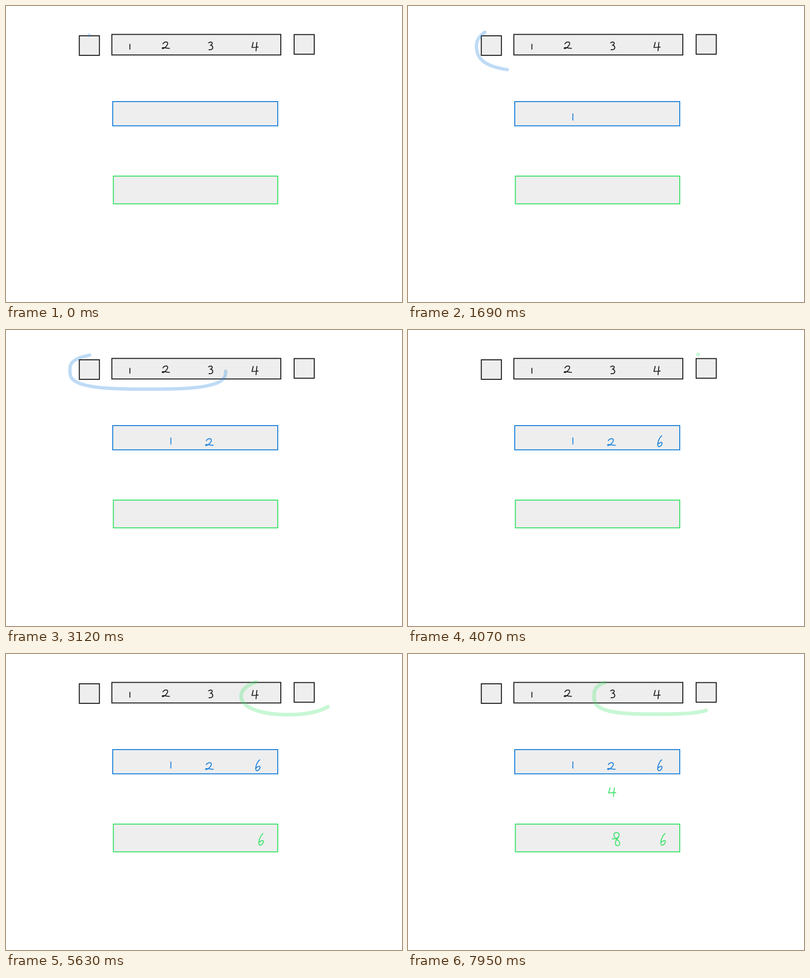
An HTML page with a canvas for the animation above (8 s loop, 768 by 576 pixels).

```html
<!DOCTYPE html>
<html lang="en">
<head>
<meta charset="utf-8">
<title>Running products</title>
<style>
  html, body { margin: 0; width: 100%; height: 100%; overflow: hidden; background: #fff; }
  canvas { display: block; width: 768px; height: 576px; }
</style>
</head>
<body>
<canvas id="stage" width="768" height="576"></canvas>
<script>
const ctx = document.getElementById('stage').getContext('2d');
const LOOP = 8000;
const INK = '#1c1c1e', BLUE = '#1f83dd', GREEN = '#3fe26c';

const sample = (fn, n) => Array.from({ length: n + 1 }, (_, i) => fn(i / n));
const gap = (a, b) => Math.hypot(b[0] - a[0], b[1] - a[1]);
const lengthOf = pts => pts.slice(1).reduce((sum, p, i) => sum + gap(pts[i], p), 0);

// Chain of cubic curves: one start point, then three points per piece.
function bezier(...p) {
  let pts = [p[0]];
  for (let i = 0; i + 3 < p.length; i += 3) {
    pts = pts.concat(sample(u => {
      const v = 1 - u;
      return [0, 1].map(k => v * v * v * p[i][k] + 3 * v * v * u * p[i + 1][k] +
        3 * v * u * u * p[i + 2][k] + u * u * u * p[i + 3][k]);
    }, 20));
  }
  return pts;
}

// Rounded loop drawn anticlockwise; open and close let its two ends stray.
function ring(cx, cy, rx, ry, { start, turns = 1, square = 2.4, open = 0, close = 0 }) {
  return sample(u => {
    const a = start - turns * 2 * Math.PI * u;
    const c = Math.cos(a), s = Math.sin(a);
    const edge = (Math.abs(c) ** square + Math.abs(s) ** square) ** (-1 / square);
    const r = edge * (1 + open * (1 - u) ** 12 - close * u ** 12);
    return [cx + rx * r * c, cy + ry * r * s];
  }, 120);
}

// Curved shaft, then a head whose arms follow the shaft's last direction.
function arrow(a, b, c, tip) {
  const back = Math.atan2(c[1] - tip[1], c[0] - tip[0]);
  const arm = turn => [tip[0] + 19 * Math.cos(back + turn), tip[1] + 19 * Math.sin(back + turn)];
  return [bezier(a, b, c, tip), [arm(-0.78), tip, arm(0.44)]];
}
const drop = (x, y) => arrow([x, y], [x + 30, y + 10], [x + 55, y + 32], [x + 67, y + 60]);

// Handwritten digits in a unit box
const DIGITS = {
  1: [[[0, 0], [0, 1]]],
  2: [bezier([0.1, 0.25], [0.25, -0.1], [0.9, -0.2], [0.72, 0.35],
    [0.55, 0.75], [0.1, 1.1], [0, 0.95], [0, 0.7], [0.5, 0.95], [1, 0.95])],
  3: [bezier([0, 0.08], [0.9, -0.25], [1.2, 0.3], [0.4, 0.4], [1.3, 0.45], [1.2, 1.1], [0.1, 1])],
  4: [[[0.2, 0], [0, 0.6], [1, 0.55]], [[0.8, 0], [0.66, 1]]],
  6: [bezier([0.85, 0], [0.2, 0.2], [-0.3, 1], [0.3, 1], [0.9, 1], [1.4, 0.3], [0.1, 0.75])],
  8: [bezier([0, 0.48], [1.1, 0.5], [1.05, 0], [0.6, 0], [-0.1, 0], [0.3, 0.42], [0.65, 0.55],
    [1.15, 0.75], [1, 1], [0.68, 1], [0.25, 1], [0.4, 0.55], [0.8, 0.38])]
};
const digit = (d, x, y, w, h) => DIGITS[d].map(s => s.map(p => [x + p[0] * w, y + p[1] * h]));

const span = (from, to, strokes) => ({
  from, to, strokes, total: strokes.reduce((sum, s) => sum + lengthOf(s), 0)
});

const marks = [];
const write = (color, from, to, ...spec) => marks.push({
  color, width: 1.8, alpha: 1, clear: Infinity, spans: [span(from, to, digit(...spec))]
});
const highlight = (color, clear, ...spans) => marks.push({
  color, width: color === BLUE ? 6.5 : 7.2, alpha: 0.29, clear, spans
});

// The given numbers
write(INK, -1, 0, 1, 240.3, 74.5, 0, 9.5);
write(INK, -1, 0, 2, 303, 70.5, 14, 12.5);
write(INK, -1, 0, 3, 393, 70.5, 8, 14.5);
write(INK, -1, 0, 4, 477, 71, 12, 16);

// Products from the left
highlight(BLUE, 1450,
  span(0, 430, [ring(200, 84, 62, 32, { start: -2.2 })]),
  span(430, 600, drop(245, 118)));
write(BLUE, 790, 880, 1, 319.7, 210, 0, 12);

highlight(BLUE, 2440,
  span(1540, 2150, [ring(236, 86, 99, 40, { start: -2.36, open: 0.17 })]),
  span(2150, 2280, drop(320, 118)));
write(BLUE, 2290, 2420, 2, 387, 212, 15, 13);

highlight(BLUE, 4010,
  span(2470, 3630, [ring(275, 79, 151, 36, { start: -2.3, turns: 1.03, square: 3 })]),
  span(3630, 3760, drop(416, 112)));
write(BLUE, 3780, 3960, 6, 484, 206, 9.5, 21);

// Products from the right
highlight(GREEN, 5290,
  span(4070, 4440, [ring(567.5, 77.5, 39.5, 30, { start: -1.69, turns: 1.07, square: 2.1, close: 0.14 })]),
  span(4440, 4720, arrow([572, 113], [584, 170], [565, 245], [502, 269])));
write(GREEN, 4940, 5200, 6, 490, 349.5, 10, 22.5);

highlight(GREEN, 7380,
  span(5380, 5850, [ring(547, 82, 91, 36, { start: -2.3, turns: 1.01, square: 2.15 })]),
  span(5850, 6230, arrow([530, 125], [591, 165], [600, 272], [417, 268])));
write(GREEN, 6500, 6730, 4, 389, 260.5, 14, 16.5);
write(GREEN, 7080, 7330, 8, 396, 347.5, 15, 25.5);

highlight(GREEN, Infinity,
  span(7550, 7950, [ring(482, 82, 121, 35, { start: -2.4, turns: 0.493, square: 3 })]));

function box(x, y, w, h, color) {
  ctx.fillStyle = '#eee';
  ctx.fillRect(x, y, w, h);
  ctx.strokeStyle = color;
  ctx.lineWidth = 1.9;
  ctx.strokeRect(x, y, w, h);
}

// Adds a stroke to the path up to the given length; returns what is left.
function trace(pts, left) {
  ctx.moveTo(...pts[0]);
  ctx.lineTo(pts[0][0] + 0.01, pts[0][1]);
  for (let i = 1; i < pts.length && left > 0; i++) {
    const [a, b] = [pts[i - 1], pts[i]];
    const d = gap(a, b), u = d > left ? left / d : 1;
    ctx.lineTo(a[0] + (b[0] - a[0]) * u, a[1] + (b[1] - a[1]) * u);
    left -= d;
  }
  return left;
}

function drawMark(m, t) {
  if (t >= m.clear) return;
  ctx.beginPath();
  for (const s of m.spans) {
    if (t < s.from) break;
    let left = s.total * Math.min(1, (t - s.from) / (s.to - s.from));
    for (const pts of s.strokes) {
      left = trace(pts, left);
      if (left < -1e-6 || t === s.from) break;
    }
  }
  ctx.globalAlpha = m.alpha;
  ctx.strokeStyle = m.color;
  ctx.lineWidth = m.width;
  ctx.stroke();
  ctx.globalAlpha = 1;
}

function draw(t) {
  ctx.fillStyle = '#fff';
  ctx.fillRect(0, 0, 768, 576);
  ctx.lineCap = 'round';
  ctx.lineJoin = 'miter';
  box(142.2, 58, 39, 38, INK);
  box(205.3, 55.3, 327.6, 40, INK);
  box(558.8, 55.6, 39, 38.2, INK);
  box(207, 186, 320, 47.2, BLUE);
  box(208.2, 331, 318.8, 54, GREEN);
  ctx.lineJoin = 'round';
  for (const m of marks) drawMark(m, t);
}

const start = performance.now();
function tick() {
  draw((performance.now() - start) % LOOP);
  requestAnimationFrame(tick);
}
tick();
</script>
</body>
</html>
```
